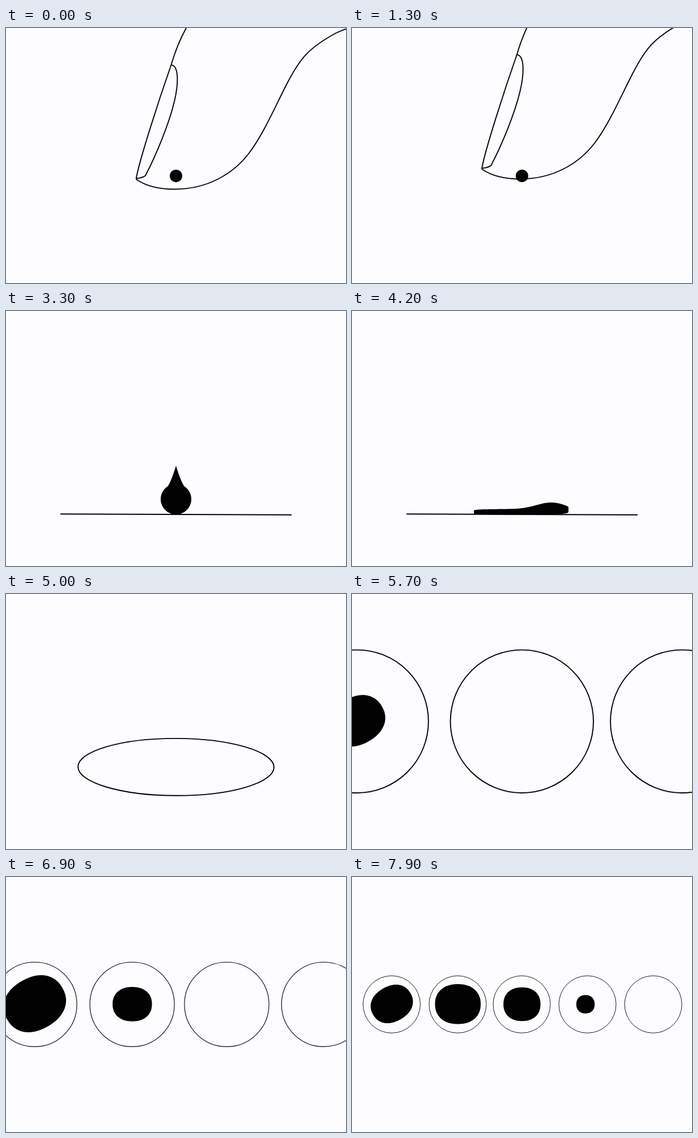
Animation of 600 by 450 pixels, one loop 8 s. Source, as an HTML page with a canvas:

```html
<!DOCTYPE html>
<html lang="en">
<head>
<meta charset="utf-8">
<title>From drop to dish</title>
<style>
  html, body { margin: 0; width: 100%; height: 100%; overflow: hidden; background: #fdfcfe; }
  canvas { display: block; width: 600px; height: 450px; }
</style>
</head>
<body>
<canvas id="stage" width="600" height="450"></canvas>
<script>
const ctx = document.getElementById('stage').getContext('2d');
const LOOP = 8000, STEP = 100, INK = '#030203', PAPER = '#fdfcfe';
const DISH_R = 126.2, SMALL_R = 50.5, MID_Y = 224.8, FLOOR = 359, LINE = 1.9;

const lerp = (a, b, k) => a + (b - a) * k;
const progress = (t, from, to) => Math.min(1, Math.max(0, (t - from) / (to - from)));
const bend = (v, power) => Math.sign(v) * Math.abs(v) ** power;

const FINGER = new Path2D(`
  M318 0 C308 18 300 36 291.5 65 C268 132 236 232 230 264 Q229.4 266.5 230.5 267.5
  C252 282 280 284.5 297 284.5 C355 284.5 400 258 428 222
  C455 187 478 132 497 96 C519 54 533 36 582 9 Q590 5 602 1
  M291.5 65 C306 67 304 101 297 130 C288 168 266 222 246 260.5 Q241 264.5 230 265.5`);

// Offsets in dish radii; colony sizes in pixels at the small radius
const DISHES = [
  { at: 0, grow: [5060, 6260], colony: { x: 0.2, y: -0.8, rx: 38, ry: 31.2, tilt: -0.52 } },
  { at: 2.307, grow: [6200, 7400], colony: { x: 0.3, y: -0.5, rx: 40.3, ry: 35.2, tilt: 0 } },
  { at: 4.545, grow: [6910, 7900], colony: { x: 0.4, y: -0.3, rx: 32.7, ry: 29.7, tilt: 0 } },
  { at: 6.842, grow: [7400, 7900], colony: { x: -3.5, y: -0.2, rx: 16.2, ry: 16.2, tilt: 0 } },
  { at: 9.14 }
];

function fillShape(count, pointAt) {
  ctx.beginPath();
  for (let i = 0; i < count; i++) ctx.lineTo(...pointAt(i / count * Math.PI * 2));
  ctx.fill();
}

function strokeEllipse(x, y, rx, ry, width, tilt = 0) {
  ctx.lineWidth = width;
  ctx.beginPath();
  ctx.ellipse(x, y, rx, ry, tilt, 0, Math.PI * 2);
  ctx.stroke();
}

function drawFinger(t) {
  const n = t < 1300 ? 0 : (t - 1200) / STEP;
  const lift = 16 * n + 2 * n * n;
  ctx.save();
  ctx.translate(-0.03 * lift, -lift);
  ctx.lineWidth = LINE;
  ctx.stroke(FINGER);
  ctx.restore();
}

// A round dot swells, grows a pointed tip, falls, then spreads into a lopsided puddle
function drawInk(t) {
  const swell = progress(t, 1300, 2500) ** 1.7;
  const fall = 41 * progress(t, 2500, 3300) ** 1.4;
  const splat = 1 - (1 - progress(t, 3300, 4200)) ** 1.6;
  const sink = progress(t, 4200, 4800);
  const r = lerp(11, 27, swell), y = lerp(261, 291, swell) + fall, spike = 32 * swell;

  fillShape(160, angle => {
    const side = Math.sin(angle), up = Math.cos(angle);
    const tip = up > 0 ? spike * Math.max(0, 1 - Math.abs(side) / 0.55) ** 1.5 : 0;
    const dropY = y - r * up - tip;

    const edge = lerp(4, 9, (side + 1) / 2);
    const crest = 9.5 + 12.5 * Math.exp(-(((side - 0.66) / 0.45) ** 2));
    const height = lerp(edge, up > 0 ? crest : -0.5, Math.abs(up) ** 0.25);

    const x = lerp(300 + r * side, 298.5 + 83.5 * side, splat);
    return [
      lerp(300, x, 1 + 0.6 * sink),
      lerp(lerp(dropY, FLOOR - height, splat), FLOOR, sink)
    ];
  });
}

// The floor line rises into view, then opens into a round dish
function drawFloor(t) {
  const open = progress(t, 4800, 5300);
  const y = Math.max(FLOOR, 442 - 0.197 * (t - 2700));
  if (open > 0) {
    strokeEllipse(300, lerp(y, MID_Y, open), lerp(204, DISH_R, open), DISH_R * open, LINE, 0.004 * (1 - open));
    return;
  }
  ctx.lineWidth = LINE;
  ctx.beginPath();
  ctx.moveTo(96, y - 0.8);
  ctx.lineTo(504, y + 0.8);
  ctx.stroke();
}

function drawColony(dishX, scale, { x, y, rx, ry, tilt }) {
  ctx.save();
  ctx.translate(dishX + x * scale, MID_Y + y * scale);
  ctx.rotate(tilt);
  ctx.scale(scale, scale);
  fillShape(90, a => [rx * bend(Math.cos(a), 0.9), ry * bend(Math.sin(a), 0.9)]);
  ctx.restore();
}

function drawDishes(t) {
  const zoom = progress(t, 5700, 7460);
  const r = lerp(DISH_R, SMALL_R, zoom), left = lerp(8.7, 70, zoom);
  for (const { at, grow, colony } of DISHES) {
    const x = left + at * r;
    strokeEllipse(x, MID_Y, r, r, Math.max(0.9, LINE * r / DISH_R));
    if (colony) drawColony(x, progress(t, ...grow) * r / SMALL_R, colony);
  }
}

function render(t) {
  ctx.fillStyle = PAPER;
  ctx.fillRect(0, 0, 600, 450);
  ctx.fillStyle = ctx.strokeStyle = INK;
  ctx.lineJoin = 'round';
  if (t >= 5700) {
    drawDishes(t);
    return;
  }
  if (t < 2200) drawFinger(t);
  if (t >= 2700) drawFloor(t);
  if (t < 4800) drawInk(t);
}

const start = performance.now();
function tick() {
  const t = (performance.now() - start) % LOOP;
  render(Math.floor(t / STEP) * STEP);
  requestAnimationFrame(tick);
}
tick();
</script>
</body>
</html>
```
